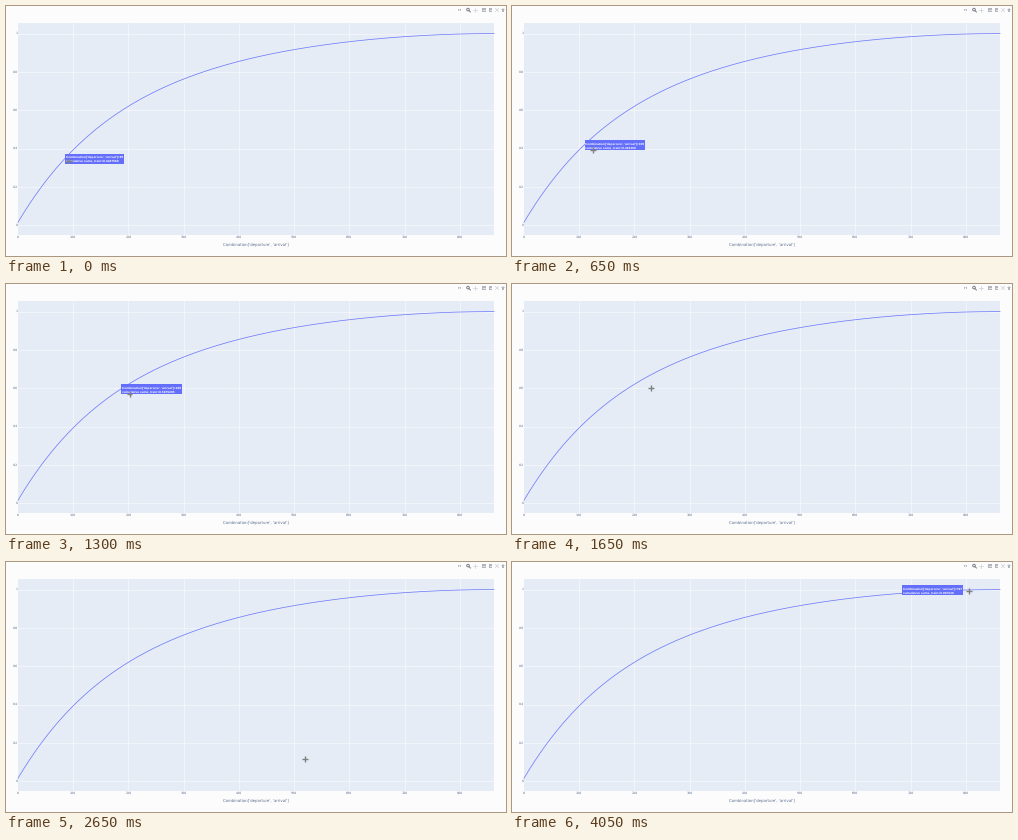
Recreate the animation shown at these times as a matplotlib script. Size 500x250 px, loop 4.1 s.

```python
import numpy as np
import matplotlib.pyplot as plt
from matplotlib.animation import FuncAnimation
from matplotlib.patches import Circle, Rectangle

W, H, DPI = 500, 250, 100
STEP, LOOP = 50, 4100
PX = 72 / DPI  # points per pixel
N = 862
X0, X1, Y0, Y1 = 12, 488, 219.3, 27.6
PAGE, PLOT, BLUE, INK = "#fcfcfc", "#e5ecf6", "#636efa", "#5d6f8f"
ICON, DARK, PALE = "#b2b6bc", "#7a7e86", "#cdd0d4"
TITLE = "Combination['departure', 'arrival']"
FOLLOW_END, RETURN = 1400, 3900  # ms, pointer leaves and rejoins the curve

plt.rcParams["text.hinting"] = "none"

# Turning points of the free pointer: ms, x, y
TURNS = np.array([
    (FOLLOW_END, 133, 104), (1650, 139, 104), (2200, 190, 101),
    (2650, 299, 197), (2800, 323, 188), (3400, 433, 25.5),
    (3650, 485, 18), (RETURN, 457, 29)])


def share(n):
    """Cumulative share: steep start, exponent easing off along u."""
    u = n / N
    power = 1.2 + 3.22 * np.exp(-1.14 * u)
    return 1 - (1 - u) ** power + 0.016 * np.exp(-14 * u) * (1 - u)


def px(n):
    return X0 + (X1 - X0) * n / N


def py(v):
    return Y0 + (Y1 - Y0) * v


def hover_at(t):
    if t <= FOLLOW_END:
        return round(85 + 24 * (t / 650) ** 2.07)
    return 797 if t >= RETURN else None


def pointer_at(t):
    if t <= FOLLOW_END:
        n = hover_at(t)
        drift = min(1, 0.45 + 0.55 * t / 650)
        return px(n) + 9 * drift, py(share(n)) + 5 * drift
    return [np.interp(t, TURNS[:, 0], TURNS[:, k]) for k in (1, 2)]


fig = plt.figure(figsize=(W / DPI, H / DPI), dpi=DPI, facecolor=PAGE)
ax = fig.add_axes([0, 0, 1, 1])
ax.set_xlim(0, W)
ax.set_ylim(H, 0)
ax.axis("off")


def line(xs, ys, color, width, **kw):
    return ax.plot(xs, ys, color=color, lw=width * PX, **kw)[0]


def label(x, y, s, size, color=INK, font="DejaVu Sans", **kw):
    kw = {"ha": "center", "va": "center", **kw}
    return ax.text(x, y, s, fontsize=size * PX, color=color, family=font, **kw)


def box(x, y, w, h, color, **kw):
    return ax.add_patch(Rectangle((x, y), w, h, fc=color, lw=0, **kw))


def draw_plot():
    grid = dict(color="white", width=0.8, alpha=0.6)
    box(X0, 17, X1 - X0, 211.5, PLOT)
    for n in range(0, N, 100):
        if n:
            line([px(n)] * 2, [17, 228.5], **grid)
        label(px(n), 230.8, str(n), 3.3)
    for v in np.arange(6) / 5:
        line([X0, X1], [py(v)] * 2, **grid)
        label(11.7, py(v), f"{v:g}", 3.3, ha="right")
    label(250, 238.2, TITLE, 3.85)
    n = np.arange(N + 1)
    line(px(n), py(share(n)), BLUE, 0.75, alpha=0.9)


def draw_toolbar(y=4):
    box(451.6, y - 1.3, 3.8, 2.8, ICON)
    ax.add_patch(Circle((453.5, y + 0.2), 0.8, fc=PAGE, lw=0))
    ax.add_patch(Circle((462, y - 0.4), 1.3, fc="none", ec=DARK, lw=0.7))
    line([463, 464.4], [y + 0.6, y + 2], DARK, 1)
    line([467.4, 470.6], [y, y], PALE, 0.7)
    line([469, 469], [y - 1.6, y + 1.6], PALE, 0.7)
    for x in (478, 484.5):
        box(x - 1.8, y - 1.8, 3.6, 3.6, ICON)
        line([x - 1, x + 1], [y, y], PAGE, 0.7)
    for s in (-1, 1):
        line([489.4, 492.6], [y - 1.6 * s, y + 1.6 * s], PALE, 0.7)
    ax.fill([494.9, 497, 499.1], [y, y - 1.8, y], fc=ICON, lw=0)
    box(495.6, y, 2.8, 1.7, ICON)


draw_plot()
draw_toolbar()

tip = box(0, 0, 1, 10, BLUE, zorder=5)
tip_rows = [label(0, 0, "", 3.3, "white", "Liberation Sans", ha="left",
                  va="baseline", weight="bold", zorder=6) for _ in range(2)]
cross = [line([], [], "#808080", 1.4, zorder=7, solid_capstyle="butt")
         for _ in range(2)]


def place_tip(n):
    x, y = px(n), py(share(n))
    texts = f"{TITLE}={n}", f"cumulative sums_train={share(n):.7g}"
    for row, s in zip(tip_rows, texts):
        row.set_text(s)
    width = max(r.get_window_extent().width for r in tip_rows) + 1.6
    left = x + 0.5 if x + width < X1 else x - 1 - width
    tip.set_bounds(left, y - 4.7, width, 10)
    for row, dy in zip(tip_rows, (-0.8, 3.5)):
        row.set_position((left + 0.8, y + dy))


def update(i):
    t = i * STEP
    n = hover_at(t)
    for part in (tip, *tip_rows):
        part.set_visible(n is not None)
    if n is not None:
        place_tip(n)
    x, y = pointer_at(t)
    cross[0].set_data([x - 2.7, x + 2.7], [y, y])
    cross[1].set_data([x, x], [y - 2.7, y + 2.7])
    return tip, *tip_rows, *cross


anim = FuncAnimation(fig, update, frames=LOOP // STEP, interval=STEP,
                     repeat=True, repeat_delay=0, blit=False)
plt.show()
```
